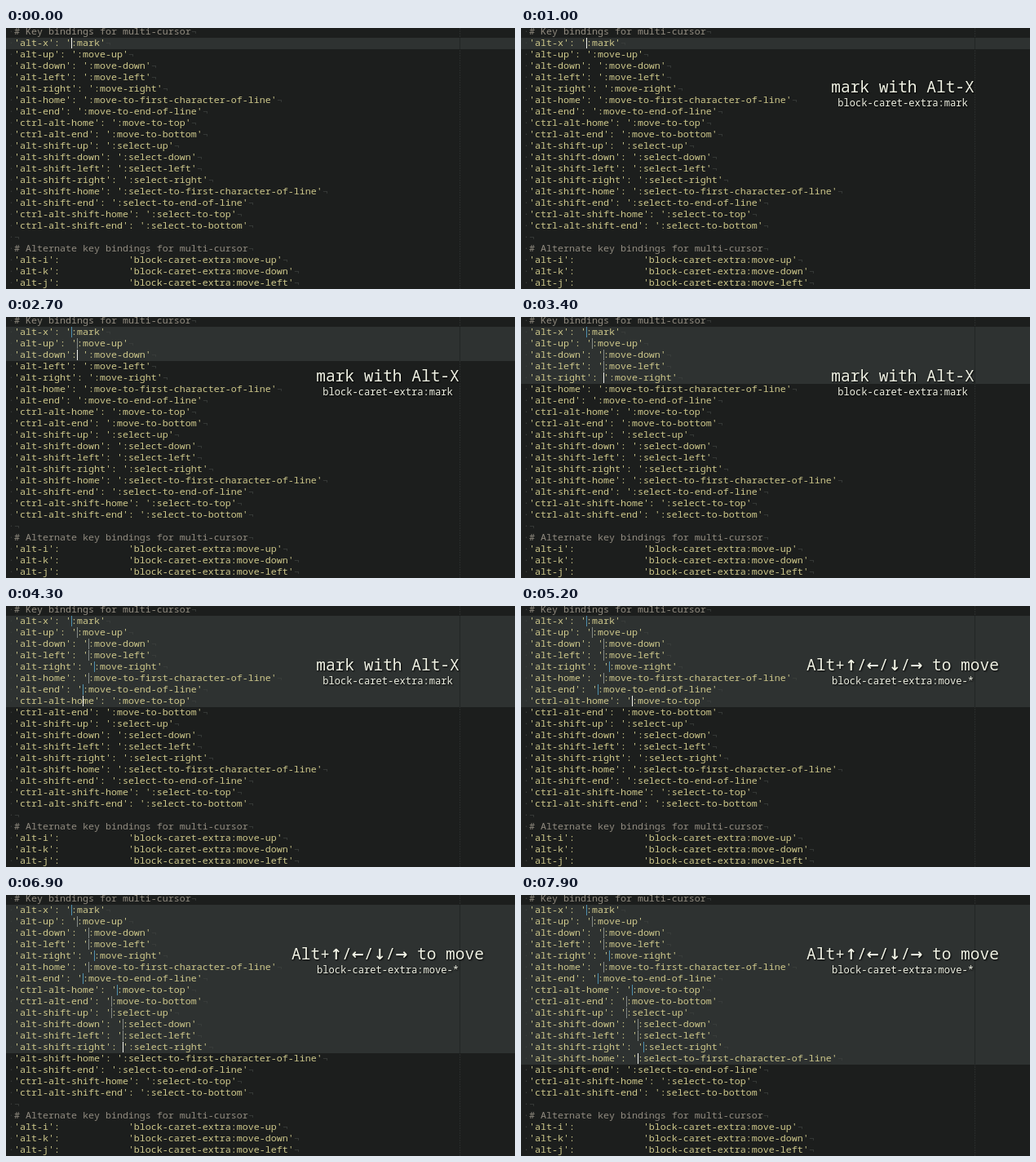
Write an HTML page with a canvas that moves like this. It is 624 px wide and 320 px high and loops after 8 s.

```html
<!DOCTYPE html>
<html lang="en">
<head>
<meta charset="utf-8">
<title>Marking cursors</title>
<style>
  html, body { margin: 0; width: 100%; height: 100%; overflow: hidden; background: #1c1e1d; }
  canvas { display: block; }
</style>
</head>
<body>
<canvas id="stage" width="624" height="320"></canvas>
<script>
const ctx = document.getElementById('stage').getContext('2d');
const W = 624, H = 320, LOOP = 8000;
const ROW = 14, COL = 7, LEFT = 10, GUIDE = 556;
const MONO = '"Noto Sans Mono", "DejaVu Sans Mono", monospace';
const PACKAGE = 'block-caret-extra';

const bind = (key, command) => `'${key}': ':${command}'`;
const alternate = (key, command) => `'${key}':`.padEnd(20) + `'${PACKAGE}:${command}'`;
const targets = {
  up: 'up', down: 'down', left: 'left', right: 'right',
  home: 'to-first-character-of-line', end: 'to-end-of-line'
};
const group = (prefix, verb) => [
  ...Object.entries(targets).map(([key, to]) => bind(prefix + key, `${verb}-${to}`)),
  bind(`ctrl-${prefix}home`, `${verb}-to-top`),
  bind(`ctrl-${prefix}end`, `${verb}-to-bottom`)
];
const lines = [
  '# Key bindings for multi-cursor',
  bind('alt-x', 'mark'),
  ...group('alt-', 'move'),
  ...group('alt-shift-', 'select'),
  '',
  '# Alternate key bindings for multi-cursor',
  alternate('alt-i', 'move-up'),
  alternate('alt-k', 'move-down'),
  alternate('alt-j', 'move-left')
];

// Time at which the cursor enters each row, starting with row 1.
const arrivals = [0, 2300, 2700, 3100, 3400, 3700, 4000, 4300, 5300, 5800, 6100, 6600, 6800, 7500];
const captions = [
  { from: 1000, to: 5100, title: 'mark with Alt-X', command: 'mark' },
  { from: 5100, to: LOOP, title: 'Alt+↑/←/↓/→ to move', command: 'move-*' }
];

const markColumn = row => lines[row].indexOf(" '") + 2;
const rowTop = row => row * ROW - 2;

function cursorAt(time) {
  const row = arrivals.filter(start => start <= time).length;
  const end = markColumn(row);
  const start = row > 1 ? markColumn(row - 1) : end;
  const steps = Math.max(0, Math.floor((time - arrivals[row - 1] - 100) / 100));
  const moved = Math.min(Math.abs(end - start), steps);
  return { row, column: start + Math.sign(end - start) * moved };
}

function rect(color, x, y, w, h) {
  ctx.fillStyle = color;
  ctx.fillRect(x, y, w, h);
}

function drawGuide(lastRow) {
  for (let y = 0; y < H; y += 3) rect('#292c2b', GUIDE, y, 1, 2);
  rect('#222625', GUIDE, rowTop(1), 1, lastRow * ROW);
}

function drawLines() {
  ctx.font = `11.667px ${MONO}`;
  ctx.textAlign = 'left';
  lines.forEach((line, row) => {
    const y = row * ROW + 8;
    ctx.fillStyle = '#3b3f3d';
    ctx.fillText('·', LEFT - COL, y);
    ctx.fillText('¬', LEFT + line.length * COL, y);
    ctx.fillStyle = line.startsWith('#') ? '#928c80' : '#cec88b';
    ctx.fillText(line, LEFT, y);
  });
}

function drawCursors({ row, column }) {
  for (let r = 1; r < row; r++) {
    const col = markColumn(r);
    rect(col % 2 ? '#858b87' : '#4f91b0', LEFT + col * COL, rowTop(r), 1, ROW - 1);
  }
  rect('#f4f4ee', LEFT + column * COL, rowTop(row), 1, ROW - 1);
}

function drawTitle(text) {
  const runs = text.split(/([↑←↓→])/).map(run => {
    const font = /[↑←↓→]/.test(run)
      ? 'bold 18px "DejaVu Sans", sans-serif'
      : `19.5px ${MONO}`;
    ctx.font = font;
    return { run, font, width: ctx.measureText(run).width };
  });
  let x = 468 - runs.reduce((sum, { width }) => sum + width, 0) / 2;
  ctx.textAlign = 'left';
  for (const { run, font, width } of runs) {
    ctx.font = font;
    ctx.fillText(run, x, 79);
    x += width;
  }
}

function drawCaption({ title, command }) {
  ctx.save();
  ctx.shadowColor = '#000';
  ctx.shadowBlur = 2;
  ctx.shadowOffsetX = ctx.shadowOffsetY = 1;
  ctx.fillStyle = '#f0f2e4';
  drawTitle(title);
  ctx.font = `12.1px ${MONO}`;
  ctx.textAlign = 'center';
  ctx.fillText(`${PACKAGE}:${command}`, 468, 96);
  ctx.restore();
}

function draw(time) {
  const cursor = cursorAt(time);
  rect('#1c1e1d', 0, 0, W, H);
  rect('#2e3231', 0, rowTop(1), W, cursor.row * ROW);
  drawGuide(cursor.row);
  drawLines();
  drawCursors(cursor);
  const caption = captions.find(({ from, to }) => time >= from && time < to);
  if (caption) drawCaption(caption);
}

function frame() {
  draw(performance.now() % LOOP);
  requestAnimationFrame(frame);
}
frame();
</script>
</body>
</html>
```
